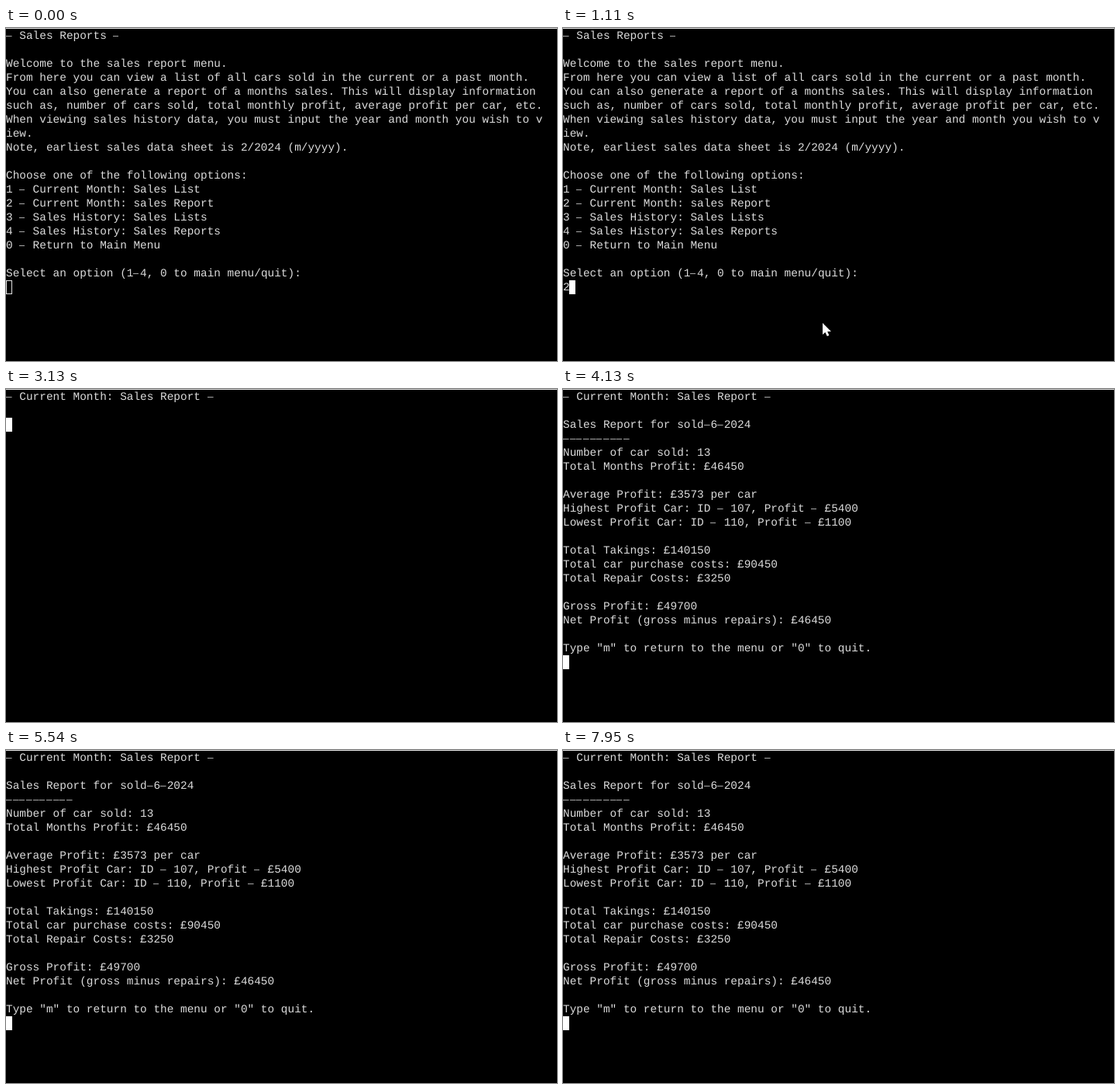
Recreate the animation shown at these times as an HTML page. Size 711 px wide and 429 px high, loop 8000 ms.

```html
<!DOCTYPE html>
<html lang="en">
<head>
<meta charset="utf-8">
<title>Sales Reports</title>
<style>
html, body { margin: 0; width: 100%; height: 100%; overflow: hidden; background: #000; }
#stage { position: relative; width: 711px; height: 429px; overflow: hidden; background: #000; }
#edge { position: absolute; left: 0; top: 0; width: 711px; height: 1px; background: #e6e6e6; }
#screen {
  position: absolute; left: 0; top: 2px; margin: 0; color: #dcdcdc;
  font: 14.43px/18px "Liberation Mono", "Courier New", monospace;
  text-rendering: geometricPrecision; font-variant-ligatures: none; white-space: pre;
}
/* hyphens are wide, thin strokes */
#screen i {
  display: inline-block; height: 18px; vertical-align: top; font-style: normal;
  color: transparent; background: linear-gradient(#a8a8a8, #a8a8a8) 0 8px / 7.6px 1px no-repeat;
}
#caret { position: absolute; width: 8px; height: 18px; box-sizing: border-box; }
#caret.idle { border: 1px solid #e0e0e0; }
#caret.live { background: #fff; }
#pointer { position: absolute; left: 0; top: 0; width: 13px; height: 19px; overflow: visible; }
</style>
</head>
<body>
<div id="stage">
  <div id="edge"></div>
  <pre id="screen"></pre>
  <div id="caret"></div>
  <svg id="pointer"><path d="M0 0V15L3.4 11.9L5.8 17L8.4 15.9L6.2 11H11Z" fill="#fff"/></svg>
</div>
<script>
const LOOP = 8000, CELL = 8.66, ROW = 18;
const $ = id => document.getElementById(id);
const output = $('screen'), caret = $('caret'), pointer = $('pointer');

const menu = `- Sales Reports -

Welcome to the sales report menu.
From here you can view a list of all cars sold in the current or a past month.
You can also generate a report of a months sales. This will display information
such as, number of cars sold, total monthly profit, average profit per car, etc.
When viewing sales history data, you must input the year and month you wish to v
iew.
Note, earliest sales data sheet is 2/2024 (m/yyyy).

Choose one of the following options:
1 - Current Month: Sales List
2 - Current Month: sales Report
3 - Sales History: Sales Lists
4 - Sales History: Sales Reports
0 - Return to Main Menu

Select an option (1-4, 0 to main menu/quit):
`;

const heading = `- Current Month: Sales Report -

`;

const report = heading + `Sales Report for sold-6-2024
----------
Number of car sold: 13
Total Months Profit: £46450

Average Profit: £3573 per car
Highest Profit Car: ID - 107, Profit - £5400
Lowest Profit Car: ID - 110, Profit - £1100

Total Takings: £140150
Total car purchase costs: £90450
Total Repair Costs: £3250

Gross Profit: £49700
Net Profit (gross minus repairs): £46450

Type "m" to return to the menu or "0" to quit.
`;

// start time, text, caret style
const steps = [
  [0, menu, 'idle'],
  [710, menu, 'live'],
  [1020, menu + '2', 'live'],
  [1420, heading, 'live'],
  [4130, report, 'live']
];

// start time, x, y
const path = [[210, 520, 340], [410, 380, 376], [510, 340, 382], [610, 335, 380]];
const POINTER_END = 2130;

let shown = -1;
function showStep(i) {
  if (i === shown) return;
  shown = i;
  const [, text, style] = steps[i];
  const lines = text.split('\n');
  output.innerHTML = text.replace(/-/g, '<i>-</i>');
  caret.className = style;
  caret.style.left = Math.floor(lines[lines.length - 1].length * CELL) + 'px';
  caret.style.top = 1 + (lines.length - 1) * ROW + 'px';
}

function placePointer(t) {
  const on = t >= path[0][0] && t < POINTER_END;
  pointer.style.display = on ? 'block' : 'none';
  if (!on) return;
  let i = path.length - 1;
  while (path[i][0] > t) i--;
  const a = path[i], b = path[i + 1] || a;
  const k = a === b ? 0 : (t - a[0]) / (b[0] - a[0]);
  const x = a[1] + (b[1] - a[1]) * k, y = a[2] + (b[2] - a[2]) * k;
  pointer.style.transform = `translate(${x}px, ${y}px)`;
}

const start = performance.now();
function draw(now) {
  const t = Math.max(0, now - start) % LOOP;
  let i = steps.length - 1;
  while (steps[i][0] > t) i--;
  showStep(i);
  placePointer(t);
  requestAnimationFrame(draw);
}
draw(start);
</script>
</body>
</html>
```
